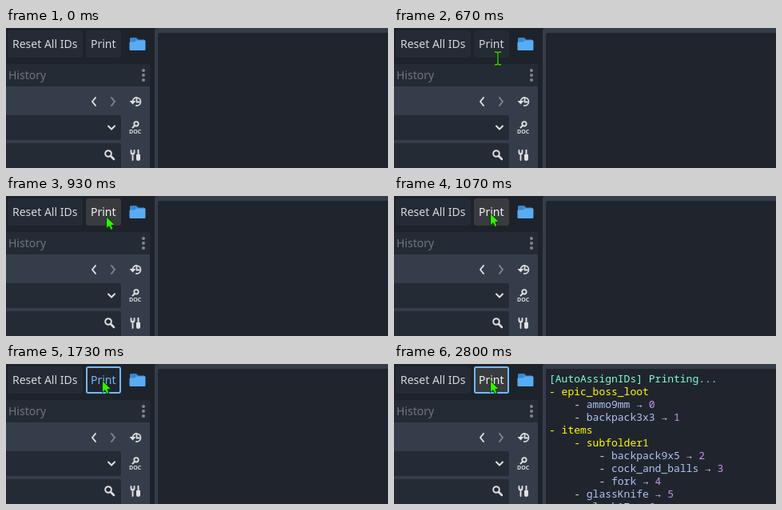
An HTML page for the animation above (4140 ms loop, 478 by 175 pixels).

```html
<!DOCTYPE html>
<html lang="en">
<head>
<meta charset="utf-8">
<title>Print IDs</title>
<style>
  html, body { margin: 0; width: 100%; height: 100%; overflow: hidden; background: #1e232b; }
  svg { display: block; width: 478px; height: 175px; }
  .ui { font: 14px "Noto Sans", sans-serif; fill: #d5d7da; }
  .log { font: 13px "Noto Sans Mono", "DejaVu Sans Mono", monospace; white-space: pre; }
  .doc { font: 700 7px "Noto Sans", sans-serif; fill: #e0e0e0; }
  .line { fill: none; stroke: #e0e0e0; stroke-width: 2; stroke-linecap: round; stroke-linejoin: round; }
</style>
</head>
<body>
<svg viewBox="0 0 478 175">
  <rect width="478" height="175" fill="#1e232b"/>

  <!-- toolbar -->
  <rect x="2" y="3" width="94" height="34" rx="3" fill="#252b34"/>
  <text class="ui" x="8" y="25">Reset All IDs</text>
  <rect id="button" x="100" y="3" width="44" height="34" rx="3"/>
  <rect id="focus" x="101" y="4" width="42" height="32" rx="2" fill="none" stroke="#70bafa" stroke-width="2"/>
  <text id="label" class="ui" x="106" y="25">Print</text>
  <path d="M155 13.5q0-1.5 1.5-1.5h6.500l2.500 2.500h7q1.500 0 1.500 1.500v9h-19z" fill="#3a87cf"/>
  <path d="M154.500 18.500q0-1 1-1h5.500l2.500-2h10q1 0 1 1v10q0 1.500-1.500 1.500h-17q-1.500 0-1.500-1.500z" fill="#58acf3"/>

  <!-- dock -->
  <path d="M0 45h177q3 0 3 3v25H0z" fill="#252b34"/>
  <text class="ui" x="3" y="64" style="fill:#70757d">History</text>
  <g fill="#82868d">
    <circle cx="172" cy="53" r="2"/><circle cx="172" cy="59" r="2"/><circle cx="172" cy="65" r="2"/>
  </g>
  <rect y="73" width="180" height="102" fill="#363d4a"/>
  <path d="M0 109h141q3 0 3 3v25q0 3-3 3H0zM0 144h141q3 0 3 3v28H0z" fill="#252b34"/>
  <path class="line" d="M112 87l-4 5 4 5"/>
  <path class="line" d="M132 87l4 5-4 5" style="stroke:#80858e"/>
  <path class="line" d="M128 122.500l4 4 4-4"/>
  <circle class="line" cx="128" cy="157" r="3.800"/>
  <path class="line" d="M131 160l4 4" style="stroke-width:2.500"/>

  <!-- side icons -->
  <path class="line" d="M158.500 91.500a5 5 0 1 1 4.500 5.500M163.500 89v3.500h3" style="stroke-width:1.800"/>
  <path d="M154.500 91h8l-4 4.500z" fill="#e0e0e0"/>
  <circle class="line" cx="163" cy="119.800" r="2.700" style="stroke-width:1.800"/>
  <path class="line" d="M161 122l-2.500 2.500"/>
  <text class="doc" x="154" y="132">DOC</text>
  <path class="line" d="M156.500 153v2.500q0 2 2 2t2-2V153M158.500 157v8" style="stroke-width:1.900"/>
  <path d="M164.500 152h2v6h1.500v6q0 2-2.500 2t-2.500-2v-6h1.500z" fill="#e0e0e0"/>

  <!-- output panel -->
  <path d="M186 175V3q0-3 3-3h289v175z" fill="#363d4a"/>
  <path d="M190 175V8q0-2 2-2h286v169z" fill="#20252d"/>
  <g id="log" class="log"></g>

  <!-- pointers -->
  <path id="arrow" d="M.5 .8V15.800L4 12.800 6.300 17.500 9 16.300 6.900 11.600 11.500 11.300z" fill="#2cf500" stroke="#12300f" stroke-linejoin="round"/>
  <g id="beam" fill="none">
    <path d="M-4-8h2.500L0-6.500 1.500-8H4M0-7V7M-4 8h2.500L0 6.500 1.500 8H4" stroke="#10210f" stroke-width="3"/>
    <path d="M-4-8h2.500L0-6.500 1.500-8H4M0-7V7M-4 8h2.500L0 6.500 1.500 8H4" stroke="#3fd81a" stroke-width="1.300"/>
  </g>
</svg>
<script>
const LOOP = 4140;
const $ = id => document.getElementById(id);
const [button, focus, label, log, arrow, beam] =
  ["button", "focus", "label", "log", "arrow", "beam"].map($);

// [depth, name, id]; entries without an id are folders
const tree = [
  [0, "epic_boss_loot"], [1, "ammo9mm", 0], [1, "backpack3x3", 1],
  [0, "items"], [1, "subfolder1"],
  [2, "backpack9x5", 2], [2, "cock_and_balls", 3], [2, "fork", 4],
  [1, "glassKnife", 5], [1, "glock17", 6]
];

function addLine(row, depth, parts) {
  const ns = "http://www.w3.org/2000/svg";
  const text = document.createElementNS(ns, "text");
  text.setAttribute("x", 194 + depth * 31.2);
  text.setAttribute("y", 23 + row * 16);
  for (const [str, fill] of parts) {
    const span = document.createElementNS(ns, "tspan");
    span.textContent = str;
    span.setAttribute("fill", fill);
    text.append(span);
  }
  log.append(text);
}

addLine(0, 0, [["[AutoAssignIDs] Printing...", "#7fffd4"]]);
tree.forEach(([depth, name, id], i) => addLine(i + 1, depth,
  id === undefined
    ? [["- " + name, "#ffff00"]]
    : [["- ", "#d5d7da"], [name, "#b0c4f5"], [" → ", "#d5d7da"], [id, "#c792f0"]]));

// pointer stops: [time, shape, x, y]
const stops = [
  [0, null, 0, 0],
  [470, beam, 103, 158], [530, beam, 112, 116], [600, beam, 122, 74], [670, beam, 130, 38],
  [730, arrow, 132, 26], [930, arrow, 125, 25], [1000, arrow, 122, 22],
  [1070, arrow, 120, 21], [1330, arrow, 120, 20]
];

const show = (el, on) => el.setAttribute("visibility", on ? "visible" : "hidden");

function render(t) {
  const [, shape, x, y] = stops.findLast(s => s[0] <= t);
  for (const el of [arrow, beam]) show(el, el === shape);
  if (shape) shape.setAttribute("transform", `translate(${x} ${y})`);

  const hover = t >= 730, pressed = t >= 1730 && t < 1800;
  button.setAttribute("fill", pressed ? "#20252d" : hover ? "#393b3e" : "#252b34");
  label.style.fill = pressed ? "#70bafa" : hover ? "#f0f1f2" : "#d5d7da";
  show(focus, t >= 1730);
  show(log, t >= 2800);
}

const start = performance.now();
function tick(now) {
  render(Math.max(0, now - start) % LOOP);
  requestAnimationFrame(tick);
}
render(0);
requestAnimationFrame(tick);
</script>
</body>
</html>
```
